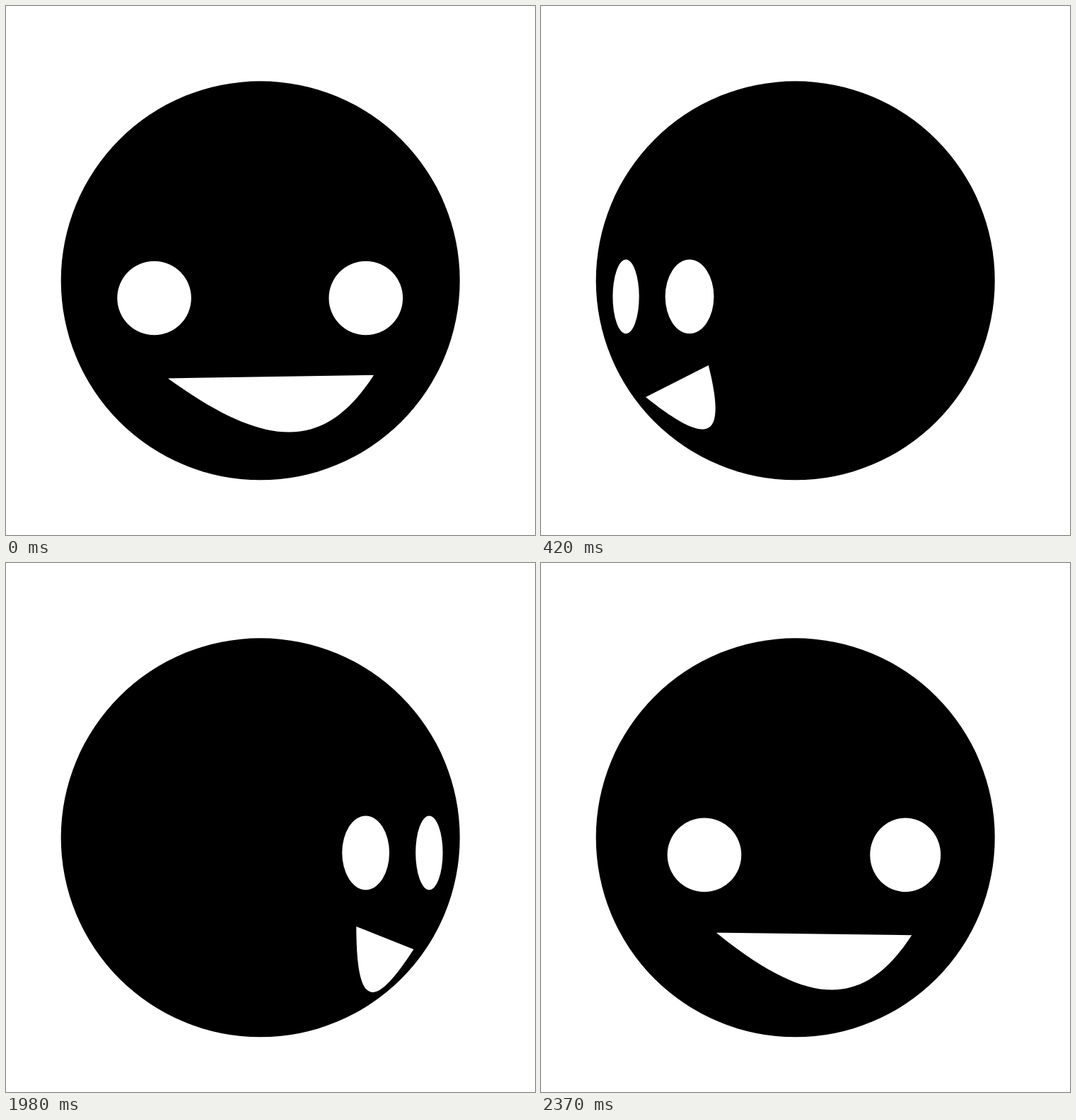
An HTML page for the animation above (2400 ms loop, 748 by 748 pixels).

```html
<!DOCTYPE html>
<html lang="en">
<head>
<meta charset="utf-8">
<title>Turning face</title>
<style>
  html, body { margin: 0; width: 100%; height: 100%; overflow: hidden; background: #fff; }
  svg { display: block; width: 100vw; height: 100vh; }
</style>
</head>
<body>
<svg viewBox="0 0 748 748">
  <circle cx="359.7" cy="388.3" r="282"/>
  <g id="face" fill="#fff">
    <ellipse id="left" ry="52.3"/>
    <ellipse id="right" ry="52.3"/>
    <path id="mouth" d="M-145.5-39C-5.5 66 75.5 66 145.5-39Z"/>
  </g>
</svg>
<script>
const LOOP = 2400, STEP = 30, TURN = 600, BACK = 1800;
const [face, left, right, mouth] =
  ['face', 'left', 'right', 'mouth'].map(id => document.getElementById(id));

// Eyes: x, y, horizontal radius. Mouth: x, y, angle, horizontal scale.
const front = { left: [209.6, 413, 52.3], right: [508.8, 413, 52.3], mouth: [375.1, 563.2, -0.9, 1] };
const gone = { left: [81.7, 410, 4.2], right: [82, 410, 26.7], mouth: [139.3, 566.2, -38, 0.06] };
const enter = { left: [636.8, 408.5, 5], right: [636.8, 408.5, 5], mouth: [584.2, 567.6, 31.3, 0] };

const mix = (a, b, k) => a.map((v, i) => v + (b[i] - v) * k);

function setEye(eye, [x, y, rx]) {
  eye.setAttribute('cx', x);
  eye.setAttribute('cy', y);
  eye.setAttribute('rx', rx);
}

function draw(t) {
  const leaving = t <= TURN;
  face.style.display = leaving || t >= BACK ? '' : 'none';
  const from = leaving ? front : enter;
  const to = leaving ? gone : front;
  const k = (leaving ? t : t - BACK) / TURN;

  const l = mix(from.left, to.left, k);
  // The near eye is already round halfway through its return.
  if (!leaving) l[2] = Math.min(52.3, 5 + 47.3 * k * 2);
  setEye(left, l);
  setEye(right, mix(from.right, to.right, k));

  const [x, y, angle, scale] = mix(from.mouth, to.mouth, k);
  mouth.setAttribute('transform', `translate(${x} ${y}) rotate(${angle}) scale(${scale} 1)`);
}

const start = performance.now();
function tick() {
  const t = Math.max(0, performance.now() - start) % LOOP;
  draw(Math.floor(t / STEP) * STEP);
  requestAnimationFrame(tick);
}
tick();
</script>
</body>
</html>
```
